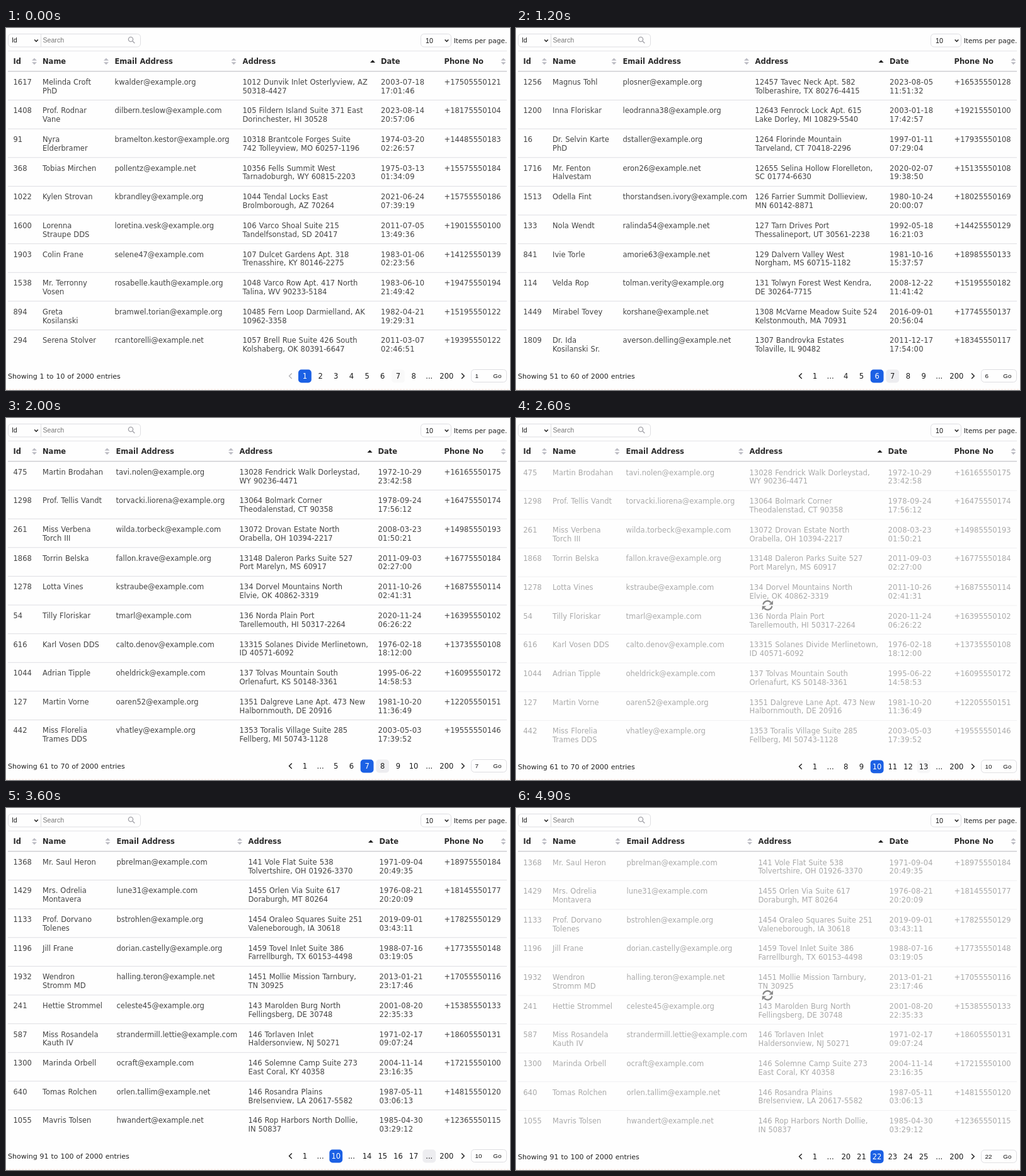
An HTML page that plays this animation: 800 px wide and 575 px high, repeating every 5000 ms.

```html
<!DOCTYPE html>
<html lang="en">
<head>
<meta charset="utf-8">
<title>Paged table</title>
<style>
  html, body { margin: 0; width: 100%; height: 100%; overflow: hidden; background: #fefefe; }
  svg { display: block; width: 800px; height: 575px; font: 11.5px "DejaVu Sans", sans-serif; word-spacing: .4px; }
  .cell { fill: #444; }
  .date { letter-spacing: .26px; }
  .head { font-weight: bold; fill: #2c2c2c; }
  .page { text-anchor: middle; fill: #1c1c1c; }
  .ui { font-family: "Liberation Sans", Arial, sans-serif; }
  .box { fill: none; stroke: #dedee2; }
  .icon { fill: none; stroke: #1c1c1c; stroke-width: 1.4; }
</style>
</head>
<body>
<svg id="stage" viewBox="0 0 800 575"></svg>
<script>
// Row: id | name | mailbox@tld | address | date; "/" breaks a line.
const tables = [
  { first: 1, x: [173, 376, 595.5], sort: [159, 361.5, 582], rows: `
1617|Melinda Croft/PhD|kwalder@org|1012 Dunvik Inlet Osterlyview, AZ/50318-4427|2003-07-18/17:01:46
1408|Prof. Rodnar/Vane|dilbern.teslow@com|105 Fildern Island Suite 371 East/Dorinchester, HI 30528|2023-08-14/20:57:06
91|Nyra/Elderbramer|bramelton.kestor@org|10318 Brantcole Forges Suite/742 Tolleyview, MO 60257-1196|1974-03-20/02:26:57
368|Tobias Mirchen|pollentz@net|10356 Fells Summit West/Tarnadoburgh, WY 60815-2203|1975-03-13/01:34:09
1022|Kylen Strovan|kbrandley@org|1044 Tendal Locks East/Brolmborough, AZ 70264|2021-06-24/07:39:19
1600|Lorenna/Straupe DDS|loretina.vesk@org|106 Varco Shoal Suite 215/Tandelfsonstad, SD 20417|2011-07-05/13:49:36
1903|Colin Frane|selene47@com|107 Dulcet Gardens Apt. 318/Trenasshire, KY 80146-2275|1983-01-06/02:23:56
1538|Mr. Terronny/Vosen|rosabelle.kauth@org|1048 Varco Row Apt. 417 North/Talina, WV 90233-5184|1983-06-10/21:49:42
894|Greta/Kosilanski|bramwel.torian@org|10485 Fern Loop Darmielland, AK/10962-3358|1982-04-21/19:29:31
294|Serena Stolver|rcantorelli@net|1057 Brell Rue Suite 426 South/Kolshaberg, OK 80391-6647|2011-03-07/02:46:51` },
  { first: 51, x: [170, 380, 593.5], sort: [155.5, 366, 579.5], rows: `
1256|Magnus Tohl|plosner@org|12457 Tavec Neck Apt. 582/Tolberashire, TX 80276-4415|2023-08-05/11:51:32
1200|Inna Floriskar|leodranna38@org|12643 Fenrock Lock Apt. 615/Lake Dorley, MI 10829-5540|2003-01-18/17:42:57
16|Dr. Selvin Karte/PhD|dstaller@org|1264 Florinde Mountain/Tarveland, CT 70418-2296|1997-01-11/07:29:04
1716|Mr. Fenton/Halvestam|eron26@net|12655 Selina Hollow Florelleton,/SC 01774-6630|2020-02-07/19:38:50
1513|Odella Fint|thorstandsen.ivory@com|126 Farrier Summit Dollieview,/MN 60142-8871|1980-10-24/20:00:07
133|Nola Wendt|ralinda54@net|127 Tarn Drives Port/Thessalineport, UT 30561-2238|1992-05-18/16:21:03
841|Ivie Torle|amorie63@net|129 Dalvern Valley West/Norgham, MS 60715-1182|1981-10-16/15:37:57
114|Velda Rop|tolman.verity@org|131 Tolwyn Forest West Kendra,/DE 30264-7715|2008-12-22/11:41:42
1449|Mirabel Tovey|korshane@net|1308 McVarne Meadow Suite 524/Kelstonmouth, MA 70931|2016-09-01/20:56:04
1809|Dr. Ida/Kosilanski Sr.|averson.delling@net|1307 Bandrovka Estates/Tolaville, IL 90482|2011-12-17/17:54:00` },
  { first: 61, x: [175, 371, 591], sort: [160.5, 357, 577.5], rows: `
475|Martin Brodahan|tavi.nolen@org|13028 Fendrick Walk Dorleystad,/WY 90236-4471|1972-10-29/23:42:58
1298|Prof. Tellis Vandt|torvacki.liorena@org|13064 Bolmark Corner/Theodalenstad, CT 90358|1978-09-24/17:56:12
261|Miss Verbena/Torch III|wilda.torbeck@com|13072 Drovan Estate North/Orabella, OH 10394-2217|2008-03-23/01:50:21
1868|Torrin Belska|fallon.krave@org|13148 Daleron Parks Suite 527/Port Marelyn, MS 60917|2011-09-03/02:27:00
1278|Lotta Vines|kstraube@com|134 Dorvel Mountains North/Elvie, OK 40862-3319|2011-10-26/02:41:31
54|Tilly Floriskar|tmarl@com|136 Norda Plain Port/Tarellemouth, HI 50317-2264|2020-11-24/06:26:22
616|Karl Vosen DDS|calto.denov@com|13315 Solanes Divide Merlinetown,/ID 40571-6092|1976-02-18/18:12:00
1044|Adrian Tipple|oheldrick@com|137 Tolvas Mountain South/Orlenafurt, KS 50148-3361|1995-06-22/14:58:53
127|Martin Vorne|oaren52@org|1351 Dalgreve Lane Apt. 473 New/Halbornmouth, DE 20916|1981-10-20/11:36:49
442|Miss Florelia/Trames DDS|vhatley@org|1353 Toralis Village Suite 285/Fellberg, MI 50743-1128|2003-05-03/17:39:52` },
  { first: 91, x: [176, 385, 593], sort: [161.5, 371, 579], rows: `
1368|Mr. Saul Heron|pbrelman@com|141 Vole Flat Suite 538/Tolvertshire, OH 01926-3370|1971-09-04/20:49:35
1429|Mrs. Odrelia/Montavera|lune31@com|1455 Orlen Via Suite 617/Doraburgh, MT 80264|1976-08-21/20:20:09
1133|Prof. Dorvano/Tolenes|bstrohlen@org|1454 Oraleo Squares Suite 251/Valeneborough, IA 30618|2019-09-01/03:43:11
1196|Jill Frane|dorian.castelly@org|1459 Tovel Inlet Suite 386/Farrellburgh, TX 60153-4498|1988-07-16/03:19:05
1932|Wendron/Stromm MD|halling.teron@net|1451 Mollie Mission Tarnbury,/TN 30925|2013-01-21/23:17:46
241|Hettie Strommel|celeste45@org|143 Marolden Burg North/Fellingsberg, DE 30748|2001-08-20/22:35:33
587|Miss Rosandela/Kauth IV|strandermill.lettie@com|146 Torlaven Inlet/Haldersonview, NJ 50271|1971-02-17/09:07:24
1300|Marinda Orbell|ocraft@com|146 Solemne Camp Suite 273/East Coral, KY 40358|2004-11-14/23:16:35
640|Tomas Rolchen|orlen.tallim@net|146 Rosandra Plains/Brelsenview, LA 20617-5582|1987-05-11/03:06:13
1055|Mavris Tolsen|hwandert@net|146 Rop Harbors North Dollie,/IN 50837|1985-04-30/03:29:12` }
];

// [start ms, page links, current page, table, loading]
const states = [
  [0, '1 2 3 4 5 6 7 8', 1, 0],
  [800, '1 ... 4 5 6 7 8 9', 6, 0, true],
  [1100, '1 ... 4 5 6 7 8 9', 6, 1],
  [1700, '1 ... 5 6 7 8 9 10', 7, 1, true],
  [2000, '1 ... 5 6 7 8 9 10', 7, 2],
  [2600, '1 ... 8 9 10 11 12 13', 10, 2, true],
  [2900, '1 ... 8 9 10 11 12 13', 10, 3],
  [3600, '1 ... 10 ... 14 15 16 17', 10, 3],
  [4000, '1 ... 10 ... 19 20 21 22', 10, 3],
  [4900, '1 ... 20 21 22 23 24 25', 22, 3, true]
];

// [start ms, link index, strength]
const hovers = [
  [0, 6, .3], [500, 5, .5], [600, 5, 1], [800, 5, .4], [900, 5, 1], [1700, 5, .3], [1800, 5, 1],
  [2300, 7, .5], [2400, 7, 1], [2600, 7, .4], [2700, 7, 1], [3400, 8, .5], [3500, 8, 1],
  [4600, 7, .5], [4700, 7, 1], [4900, 7, 0]
];

const stage = document.getElementById('stage');
const at = (list, t) => list.findLast(item => item[0] <= t);
const text = (x, y, s, attrs) => `<text x="${x}" y="${y}" ${attrs}>${s}</text>`;
const path = (x, y, d, attrs) => `<path transform="translate(${x} ${y})" d="${d}" ${attrs}/>`;
const line = (y, color, width = 1) => path(3, y, 'M0 0H792', `stroke="${color}" stroke-width="${width}"`);
const box = (x, y, w, h, attrs) => `<rect x="${x}" y="${y}" width="${w}" height="${h}" rx="5" ${attrs}/>`;
const ui = (x, y, s, size, fill = '#111') => text(x, y, s, `class="ui" font-size="${size}" fill="${fill}"`);
const phone = id => `+1${201 + id * 37 % 780}55501${String(id * 13 % 100).padStart(2, '0')}`;
const columns = x => [12, 58.5, ...x, 696].map(left => left - .5);

const toolbar =
  box(3.5, 9.5, 210, 20.5, 'class="box"') + path(55.5, 10, 'M0 0V20', 'class="box"') +
  ui(9.3, 23, 'Id', 10) + path(48, 20, 'M-2.8-1.5L0 1.5 2.8-1.5', 'class="icon"') +
  ui(58.5, 23.3, 'Search', 10.6, '#777') +
  path(198, 18, 'M-3.6 0a3.6 3.6 0 1 1 7.2 0a3.6 3.6 0 1 1-7.2 0M2.6 2.6L6.3 6.3', 'class="icon" style="stroke:#a2a2a8"') +
  box(658.5, 9.5, 48, 20.5, 'class="box"') + ui(666, 23.5, '10', 10.6) +
  path(699.5, 20, 'M-2.8-1.5L0 1.5 2.8-1.5', 'class="icon"') +
  text(710.7, 23.5, 'Items per page.', 'font-size="10.6" fill="#222"');

function header({ x, sort }) {
  const titles = ['Id', 'Name', 'Email Address', 'Address', 'Date', 'Phone No'];
  const arrows = [45, sort[0], sort[1], 789.5];
  return line(36.5, '#e4e4e8') + line(68.8, '#cfcfd4', 1.5) +
    columns(x).map((left, i) => text(left, 57.2, titles[i], 'class="head"')).join('') +
    arrows.map(a => path(a, 53, 'M-4-1.2h8l-4-4zM-4 1.2h8l-4 4z', 'fill="#babac2"')).join('') +
    path(sort[2], 53, 'M-4 2h8l-4-4.2z', 'fill="#1c1c1c"');
}

function body({ x, rows }) {
  const lefts = columns(x);
  return rows.trim().split('\n').map((row, r) => {
    const top = r * 45.63;
    const cells = row.replace('@', '@example.').split('|');
    cells.push(phone(+cells[0]));
    return (r ? line(68.9 + top, '#dedee3') : '') + cells.map((cell, c) =>
      cell.split('/').map((s, k) =>
        text(lefts[c], 89.8 + top + k * 13.8, s, `class="cell ${c === 4 ? 'date' : ''}"`)).join('')
    ).join('');
  }).join('');
}

function pager(links, current, [, over, strength]) {
  const cells = (links + ' ... 200').split(' ');
  const center = i => i === 9 ? 699.3 : 474.4 + i * 24.67;
  const square = (i, attrs) => box(center(i) - 10.4, 542.6, 20.8, 20.8, attrs);
  return square(over, `fill="#ededf0" opacity="${strength}"`) +
    cells.map((s, i) => {
      const active = s === String(current);
      return (active ? square(i, 'fill="#1b60e4"') : '') +
        text(center(i), 557, s, `class="page" ${active ? 'style="fill:#fff"' : ''}`);
    }).join('') +
    path(451.5, 552.8, 'M2.2-4.2L-2 0 2.2 4.2', `class="icon" ${current === 1 ? 'style="stroke:#b4b4b8"' : ''}`) +
    path(725.3, 552.8, 'M-2.2-4.2L2 0-2.2 4.2', 'class="icon"') +
    box(738.5, 542.5, 56, 20, 'class="box"') + ui(744.6, 556.3, current, 9.9) + ui(773.3, 556.3, 'Go', 9.8);
}

const spinner = angle => `<g transform="translate(399.3 297.6) rotate(${angle})">` + [0, 180].map(turn =>
  `<g transform="rotate(${turn})"><path d="M-7-1.2A7 7 0 0 1 5.2-4.6" fill="none" stroke="#878787" stroke-width="2.3"/>
   <path d="M8.6-7.6V-1.2H2.2z" fill="#878787"/></g>`).join('') + '</g>';

function draw(t) {
  const [start, links, current, index, loading] = at(states, t);
  const table = tables[index];
  const shift = `transform="translate(0 ${loading ? .8 : 0})"`;
  stage.innerHTML = toolbar + header(table) +
    `<g ${shift} opacity="${loading ? .45 : 1}">${body(table)}</g>` +
    `<g ${shift}>` +
    text(3, 557, `Showing ${table.first} to ${table.first + 9} of 2000 entries`, 'font-size="11" fill="#222"') +
    pager(links, current, at(hovers, t)) + '</g>' +
    path(0, 574, 'M0 0H800', 'stroke="#fbe6dd" stroke-dasharray="3 2"') +
    (loading ? spinner((t - start) * .4) : '');
}

// The picture advances in steps of 100 ms.
let shown = -1;
const origin = performance.now();
function tick() {
  const t = Math.floor((performance.now() - origin) % 5000 / 100) * 100;
  if (t !== shown) draw(shown = t);
  requestAnimationFrame(tick);
}
tick();
</script>
</body>
</html>
```
